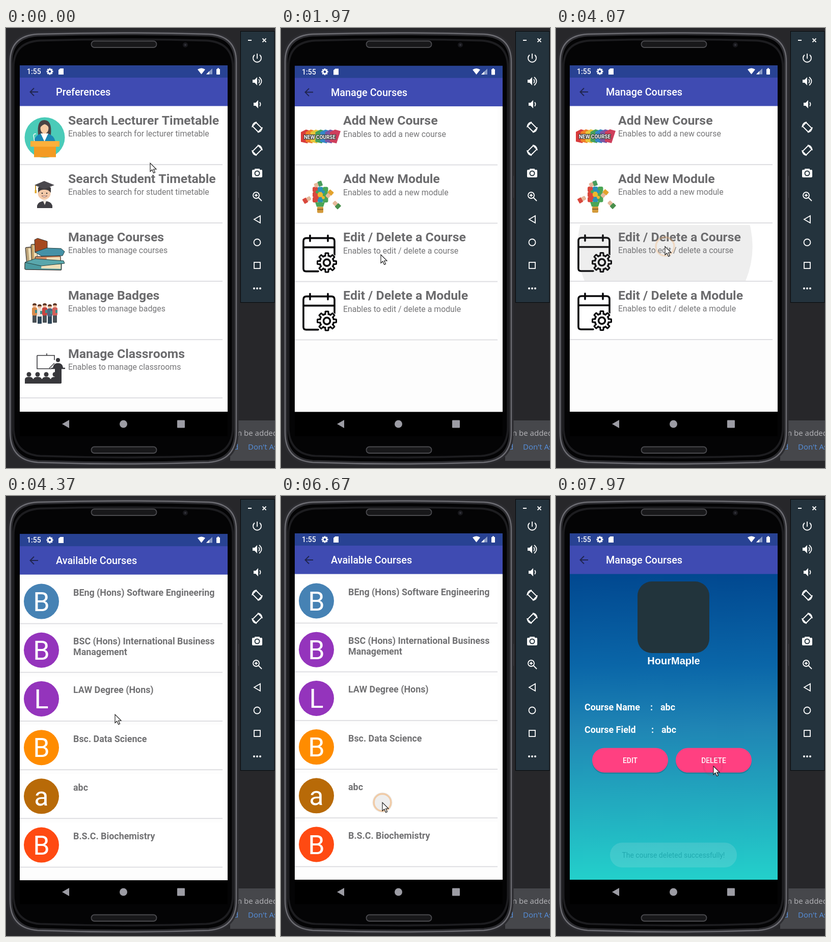
An HTML page that plays this animation: 528x860 px, repeating every 8000 ms.

```html
<!DOCTYPE html>
<html lang="en">
<head>
<meta charset="utf-8">
<title>Timetable app demo</title>
<style>
html, body { margin: 0; width: 100%; height: 100%; overflow: hidden; background: #27272a; }
svg { display: block; width: 528px; height: 860px; font-family: Roboto, sans-serif; }
.title { font-weight: 700; font-size: 24.8px; font-kerning: none; fill: #6b6b6d; }
.sub { font-size: 15.87px; fill: #757577; }
.course { font-weight: 700; font-size: 17.86px; fill: #717173; }
.letter { font-size: 52px; fill: #fff; text-anchor: middle; }
.bar { font-weight: 500; font-size: 19.84px; fill: #fff; }
.field { font-weight: 700; font-size: 17.86px; fill: #fff; }
.button { font-weight: 500; font-size: 13.9px; fill: #fff; text-anchor: middle; }
.line { fill: none; stroke: #fff; stroke-width: 1.8; }
.bold { fill: none; stroke: #08080a; stroke-width: 3.6; stroke-linecap: round; stroke-linejoin: round; }
</style>
</head>
<body>
<svg id="stage" viewBox="0 0 528 860"></svg>
<script>
const LOOP = 8000;
const stage = document.getElementById('stage');
const rect = (x, y, w, h, fill, r = 0, more = '') =>
  `<rect x="${x}" y="${y}" width="${w}" height="${h}" rx="${r}" fill="${fill}" ${more}/>`;
const dot = (x, y, r, fill, more = '') => `<circle cx="${x}" cy="${y}" r="${r}" fill="${fill}" ${more}/>`;
const path = (d, fill, more = '') => `<path d="${d}" fill="${fill}" ${more}/>`;
const line = (d, cls = 'line') => `<path d="${d}" class="${cls}"/>`;
const text = (x, y, cls, s, more = '') => `<text x="${x}" y="${y}" class="${cls}" ${more}>${s}</text>`;
const at = (x, y, s, angle = 0) => `<g transform="translate(${x} ${y}) rotate(${angle})">${s}</g>`;
const range = n => [...Array(n).keys()];

// Icons are drawn relative to the top left of their card.
function lecturer() {
  return dot(49, 61, 39.5, '#4acbb8') +
    path('M36 56 Q33 27 48 27 Q64 27 61 56 Z', '#4a4344') +
    path('M28 69 Q30 56 43 53 L54 53 Q67 56 70 69 Z', '#1b86b4') +
    path('M41 53 L48.5 69 L56 53 Z', '#fff') +
    `<ellipse cx="48.5" cy="43" rx="8" ry="10.5" fill="#f7cba4"/>` +
    path('M39 43 Q41 31 50 31 Q58 33 58 43 Q54 36 49 35 Q44 36 39 43 Z', '#4a4344') +
    path('M29 69 L27 57 Q28 53 32 54', 'none', 'stroke="#f2f6f4" stroke-width="1.5"') +
    rect(21, 68, 57, 11, '#fbb03b', 1) + rect(28, 79, 43, 20.5, '#f39a22');
}

function graduate() {
  return path('M34 85 V80 Q36 72 49 71 Q62 72 64 80 V85 Z', '#403f44') +
    path('M45 69 H53 L49 79 Z', '#eee8e0') + dot(48, 56, 12.5, '#f3c9a8') +
    path('M36 45 Q48 37 61 45 V55 Q56 48 48 49 Q40 48 36 55 Z', '#3d3a3c') +
    path('M29 40 L48 32 L68 40 L48 48 Z', '#4a484d') +
    path('M31 41 V51', 'none', 'stroke="#c7992c" stroke-width="2"') + rect(29.5, 50, 3.5, 6, '#e0a92f') +
    dot(44, 56, 1.3, '#333') + dot(53, 56, 1.3, '#333') +
    path('M43 61 Q48 66 54 61 Z', '#fff', 'stroke="#843" stroke-width=".8"');
}

function books() {
  const book = (x, y, w, h, fill, tilt) =>
    at(x, y, rect(0, 0, w, h, fill, 2, 'stroke="#3a3530" stroke-width="1.2"') +
      rect(w * .45, 2.5, w * .53, h - 5, '#efdfb8'), tilt);
  return book(11, 48, 12, 32, '#bca37a', -5) + book(22, 42, 11, 36, '#c8a46a', -3) +
    path('M29 33 L35 30 L54 36 V54 L30 58 Z', '#a5481f', 'stroke="#3a3530"') +
    path('M30 57 L53 49 L81 50 L88 56 L84 64 L43 65 Z', '#4591a6', 'stroke="#26413f"') +
    book(30, 66, 50, 14, '#d58b60', -2) + book(10, 77, 72, 14, '#4b9aa0', 1) +
    path('M10 77 L30 70 L86 74 L88 79 L42 84 Z', '#59a7ac', 'stroke="#26413f"');
}

function crowd() {
  const shirts = ['#d88b4c', '#e8e2dc', '#c64440', '#4d6580', '#d2605a'];
  return shirts.map((c, i) => {
    const x = 29 + i * 10, y = 47 + i % 2 * 2;
    return rect(x - 4, y + 15, 8, 19, ['#4a5156', '#2f4658'][i % 2], 1) +
      rect(x - 5, y + 4, 10, 16, c, 3) + dot(x, y, 4, '#edb896') +
      path(`M${x - 4} ${y} a4 4 0 0 1 8 0 Z`, '#5d3828') + rect(x + 1, y + 9, 4, 6, '#3f8f8c');
  }).join('');
}

function classroom() {
  const c = '#38383c';
  return path('M34 31 V57 H62 M34 31 H68 V40 M53 27 V31', 'none', `stroke="${c}" stroke-width="1.6"`) +
    path('M58 56 L68 46', 'none', `stroke="${c}" stroke-width="1.5"`) +
    dot(75, 40, 4, c) + path('M65 55 Q66 46 75 46 Q84 46 85 55 Z', c) +
    rect(62, 55, 27, 2.5, c) + rect(69, 57, 13, 28, c) +
    range(4).map(i => dot(18 + i * 17, 68, 4.5, c) +
      path(`M${10 + i * 17} 86 V78 Q${10 + i * 17} 73 ${18 + i * 17} 73 Q${26 + i * 17} 73 ${26 + i * 17} 78 V86 Z`, c)).join('') +
    rect(10, 77, 72, 9, c, 2);
}

function newCourse() {
  const colors = ['#d83b3b', '#ef7f28', '#e6c63b', '#45a05b', '#3487c8', '#7c55a3', '#ce3f5c'];
  return colors.map((c, i) => path(`M${12 + i * 9.5} 50 l10 -5 l11 3 l-8 24 l-13 -3 Z`, c)).join('') +
    text(49, 63, '', 'NEW COURSE', 'text-anchor="middle" font-size="10" font-weight="700" fill="#fff" stroke="#333" stroke-width="2" paint-order="stroke"');
}

function puzzle() {
  const colors = ['#d9483d', '#edb72e', '#4aa556', '#2b91b8'];
  const hand = (x, y, a, c) => at(x, y, rect(-8, -4, 9, 8, '#e6b99b', 2) + rect(0, -5, 8, 10, c, 1), a);
  return range(9).map(i => rect(35 + i % 3 * 10, 43 + (i / 3 | 0) * 10, 10.5, 10.5, colors[i * 3 % 4 ^ (i / 3 | 0)], 3)).join('') +
    range(4).map(i => dot(44 + i % 2 * 12, 53 + (i / 2 | 0) * 11, 3, colors[(i + 2) % 4])).join('') +
    path('M40 73 H59 L56 82 H43 Z', '#4aa556') + rect(44, 82, 12, 12, '#d39a3b', 2) +
    rect(44, 86, 12, 2, '#8f652c') +
    hand(46, 38, -20, '#499c5c') + hand(24, 68, 150, '#d9483d') + hand(82, 78, 45, '#498f4c') + hand(68, 57, -50, '#e3a32d');
}

function calendar() {
  const gear = range(8).map(i => rect(-4.5, -20, 9, 9, '#08080a', 2, `transform="rotate(${i * 45})"`)).join('') +
    dot(0, 0, 15.5, '#08080a') +
    range(8).map(i => rect(-1.5, -17, 3, 6, '#fff', 0, `transform="rotate(${i * 45})"`)).join('') +
    dot(0, 0, 12, '#fff') + dot(0, 0, 6.5, 'none', 'stroke="#08080a" stroke-width="3.6"');
  return line('M46 94 H22 Q17 94 17 89 V35 Q17 29 23 29 H72 Q78 29 78 35 V62 M17 47 H78 M30 24 V35 M65 24 V35', 'bold') +
    at(63, 77, dot(0, 0, 21, '#fff') + gear);
}

function appBar(name) {
  const gear = range(8).map(i => rect(-1.5, -6.5, 3, 4, '#fff', 0, `transform="rotate(${i * 45})"`)).join('');
  return rect(27, 73, 408, 24.5, '#284293') + rect(27, 97, 408, 55.5, '#3f4bb2') +
    text(41, 90, 'bar', '1:55', 'style="font-size:14px"') +
    at(86, 85, gear + dot(0, 0, 3.6, 'none', 'stroke="#fff" stroke-width="2.2"')) +
    path('M103 82 L106.5 79 H113 V91 H103 Z', '#fff') +
    path('M376 81 Q383.5 76 391 81 L383.5 90.5 Z', '#fff') +
    path('M393 90.5 L405 79 V90.5 Z', '#8b9cc8') + path('M393 90.5 L399 84.5 V90.5 Z', '#fff') +
    rect(413, 80, 7, 11, '#fff', 1) + rect(415, 78.5, 3, 2, '#fff') +
    path('M63 125 H48 M55 117.5 L47.5 125 L55 132.5', 'none', 'stroke="#20254f" stroke-width="2"') +
    text(98, 132, 'bar', name);
}

const listBack = rect(27, 152, 408, 598, '#fdfdfd');
const card = (y, h) => rect(27, y, 398, h, '#fff') + rect(27, y + h, 398, 1.8, '#dcdce0');

function menu(name, items) {
  return listBack + items.map(([title, sub, icon], i) => {
    const y = 153 + i * 114;
    return card(y + (i ? 4 : 0), i ? 109 : 113) + at(27, y, icon()) +
      text(122, y + 35.5, 'title', title) + text(122, y + 59, 'sub', 'Enables to ' + sub);
  }).join('') + appBar(name);
}

function courses() {
  const items = [
    ['#4682b4', 'BEng (Hons) Software Engineering'],
    ['#9434bc', 'BSC (Hons) International Business|Management'],
    ['#9434bc', 'LAW Degree (Hons)'],
    ['#ff8c00', 'Bsc. Data Science'],
    ['#b86a08', 'abc'],
    ['#ff4a12', 'B.S.C. Biochemistry']];
  return listBack + items.map(([color, name], i) => {
    const y = 152 + i * 95.2;
    return card(y + 9, 86.5) + dot(69.5, y + 53, 34.5, color) +
      text(69.5, y + 71.5, 'letter', name[0]) +
      name.split('|').map((s, k) => text(132, y + 42 + k * 20.9, 'course', s)).join('');
  }).join('') + appBar('Available Courses');
}

function details() {
  const button = (x, label) => rect(x, 495, 149, 48, '#00000028', 24) +
    rect(x, 492.5, 149, 48, '#ff4081', 24) + text(x + 74.5, 522, 'button', label);
  const field = (y, name, colon, value) => text(56, y, 'field', name) +
    text(colon, y, 'field', ':') + text(value, y, 'field', 'abc');
  return rect(27, 152, 408, 598, 'url(#sea)') + rect(160, 167, 141, 140, '#22343c', 28) +
    text(231, 328.5, '', 'HourMaple', 'text-anchor="middle" font-family="Liberation Sans, sans-serif" font-weight="700" font-size="20" fill="#fff"') +
    field(419, 'Course Name', 185, 205) + field(463, 'Course Field', 187, 207) +
    button(71, 'EDIT') + button(235, 'DELETE') + appBar('Manage Courses');
}

function toolbar() {
  const speaker = 'M-9 -3 H-5 L0 -8 V8 L-5 3 H-9 Z';
  const rotate = rect(-5, -8, 10, 16, 'none', 1, 'stroke="#fff" stroke-width="2" transform="rotate(-45)"') +
    line('M-10 0 Q-9 -9 -1 -10 M10 0 Q9 9 1 10');
  const icons = [
    line('M0 -9 V1 M-5 -6.5 A8 8 0 1 0 5 -6.5'),
    path(speaker, '#fff') + line('M3 -4 Q6 0 3 4 M4 -8 Q13 0 4 8'),
    at(2, 0, path(speaker, '#fff') + line('M3 -4 Q6 0 3 4')),
    rotate, `<g transform="scale(-1 1)">${rotate}</g>`,
    rect(-10, -7, 20, 15, '#fff', 2) + rect(-5, -9, 10, 4, '#fff', 1) + dot(0, 0, 4.5, 'none', 'stroke="#24333d" stroke-width="2"'),
    dot(-2, -2, 6, 'none', 'class="line"') + line('M2.5 2.5 L9 9 M-5 -2 H1 M-2 -5 V1'),
    line('M-6 0 L6 -7 V7 Z'), dot(0, 0, 6.5, 'none', 'class="line"'),
    rect(-6, -6, 12, 12, 'none', 0, 'class="line"'),
    range(3).map(i => dot(i * 6 - 6, 0, 2, '#fff')).join('')];
  return rect(460.5, 6.5, 66.5, 530, '#24333d', 0, 'stroke="#06080a"') +
    line('M475 24 H482 M503.5 20.5 L510.5 27.5 M510.5 20.5 L503.5 27.5') +
    icons.map((s, i) => at(493, 59 + i * 45, s)).join('');
}

function phone() {
  const outline = 'M8 66 Q8 15 62 12 Q230 7 398 12 Q452 15 452 66 V790 Q452 845 398 849 Q230 855 62 849 Q8 845 8 790 Z';
  const slot = y => rect(167.5, y, 128, 12.5, '#18181a', 6, 'stroke="#4a4a4e" stroke-width="1.8"');
  return rect(453, 289, 3.5, 43, '#75757a') + rect(452, 360, 4, 101, '#75757a') +
    path(outline, '#040405', 'stroke="#2c2c30" stroke-width="9"') +
    path(outline, 'none', 'stroke="#6c6c72" stroke-width="2.4"') +
    path(outline, 'none', 'stroke="#1d1d20" stroke-width="4" transform="translate(6.9 12.9) scale(.97)"') +
    slot(25.5) + slot(818.5) + dot(352, 33, 5, '#18181c') + dot(352, 33, 2, '#33333a') +
    rect(27, 750, 408, 48, '#000') +
    path('M110 774 L124 766 V782 Z', '#9c9ca4') + dot(230.5, 774, 7.5, '#9c9ca4') + rect(336, 766.5, 15, 15, '#9c9ca4', 1);
}

const screens = [
  menu('Preferences', [
    ['Search Lecturer Timetable', 'search for lecturer timetable', lecturer],
    ['Search Student Timetable', 'search for student timetable', graduate],
    ['Manage Courses', 'manage courses', books],
    ['Manage Badges', 'manage badges', crowd],
    ['Manage Classrooms', 'manage classrooms', classroom]]),
  menu('Manage Courses', [
    ['Add New Course', 'add a new course', newCourse],
    ['Add New Module', 'add a new module', puzzle],
    ['Edit / Delete a Course', 'edit / delete a course', calendar],
    ['Edit / Delete a Module', 'edit / delete a module', calendar]]),
  courses(), details()];

const sea = [[0, '#014890'], [30, '#0a66a8'], [50, '#1f84b4'], [75, '#22aabf'], [100, '#23d0cb']];

stage.innerHTML =
  `<defs><linearGradient id="sea" x2="0" y2="1">${sea.map(([o, c]) => `<stop offset="${o}%" stop-color="${c}"/>`).join('')}</linearGradient>
  <clipPath id="reveal"><rect id="window" x="27" width="408"/></clipPath>
  <clipPath id="pressed"><rect id="row" x="27" width="398"/></clipPath></defs>` +
  rect(0, 0, 528, 860, '#27272a') + rect(440, 767, 88, 79, '#46474b') +
  `<g font-family="Open Sans, sans-serif" font-size="15">` +
  text(454, 797, '', 'n be added', 'fill="#b6b6ba"') + text(447, 824, '', 'd', 'fill="#5690de"') +
  text(475, 824, '', "Don't Ask", 'fill="#5690de"') + '</g>' +
  phone() + toolbar() +
  screens.map((s, i) => `<g id="screen${i}">${s}</g>` + (i < 3 ? rect(27, 58, 408, 692, '#000', 0, `id="shade${i}"`) : '')).join('') +
  `<g clip-path="url(#pressed)">${dot(0, 0, 0, '#777', 'id="ripple"')}</g>
  <g id="toast">${rect(106, 677.5, 249, 48.5, '#eee', 24)}${text(230.5, 707, '', 'The course deleted successfully!', 'text-anchor="middle" font-size="13.9" fill="#112"')}</g>
  ${dot(0, 0, 0, 'none', 'id="ring" stroke-width="3.5"')}
  ${path('M0 0 V16.5 L3.8 13 L6.7 19.5 L9.5 18.3 L6.6 12 H12 Z', '#fff', 'id="cursor" stroke="#111" stroke-width="1.1"')}`;

const el = id => document.getElementById(id);
const set = (node, attrs) => { for (const k in attrs) node.setAttribute(k, attrs[k]); };
const clamp = v => Math.min(1, Math.max(0, v));

const bezier = (a, b, c, d, s) =>
  a * (1 - s) ** 3 + 3 * b * s * (1 - s) ** 2 + 3 * c * s * s * (1 - s) + d * s ** 3;

// Fast start with a very long settle, built from two joined curves.
function settle(x) {
  if (x <= 0 || x >= 1) return clamp(x);
  const [xs, ys] = x < 1 / 6
    ? [[0, .05, .1333, 1 / 6], [0, 0, .06, .4]]
    : [[1 / 6, .2083, .25, 1], [.4, .82, 1, 1]];
  let lo = 0, hi = 1;
  for (let i = 0; i < 24; i++) {
    const mid = (lo + hi) / 2;
    if (bezier(...xs, mid) < x) lo = mid; else hi = mid;
  }
  return bezier(...ys, lo);
}

const opens = [1696, 4133, 6933];
const clicks = [
  { t: 1440, x: 196, y: 443, top: 385, h: 109 },
  { t: 3880, x: 214, y: 427, top: 385, h: 109 },
  { t: 6580, x: 199, y: 599, top: 542, h: 86 },
  { t: 7690, x: 308, y: 528 }];
const moves = [
  [0, 283, 264], [150, 283, 264], [830, 196, 443], [2050, 196, 443], [2650, 248, 245],
  [3050, 248, 245], [3700, 214, 427], [4900, 214, 427], [5650, 214, 345], [6380, 199, 599],
  [6950, 199, 599], [7170, 203, 594], [7340, 203, 594], [7670, 309, 528], [LOOP, 309, 528]];

function pointer(t) {
  const i = moves.findIndex(m => m[0] > t);
  const [t0, x0, y0] = moves[i - 1], [t1, x1, y1] = moves[i];
  const k = (t - t0) / (t1 - t0), e = k * k * (3 - 2 * k);
  return [x0 + (x1 - x0) * e, y0 + (y1 - y0) * e];
}

function showScreens(t) {
  const current = opens.filter(o => t >= o).length;
  const age = current ? t - opens[current - 1] : 425;
  const p = settle(age / 425);
  screens.forEach((_, i) => {
    const entering = i === current, leaving = i === current - 1 && p < .7;
    const y = entering ? 30.4 * (1 - p) : -15.2 * p;
    const node = el('screen' + i);
    node.style.display = entering || leaving ? '' : 'none';
    node.setAttribute('transform', `translate(0 ${y})`);
    if (entering && p < 1) node.setAttribute('clip-path', 'url(#reveal)');
    else node.removeAttribute('clip-path');
    if (i < 3) set(el('shade' + i), {
      opacity: leaving ? .1 * clamp(age / 117) : 0, y: 73 + y, height: 677 });
  });
  const h = 677 * clamp(2.1 * p);
  set(el('window'), { y: 750 - h, height: h });
}

function showClick(t) {
  const click = clicks.find(c => t >= c.t && t < c.t + 350);
  const age = click ? t - click.t : 350;
  const { x = 0, y = 0, top, h } = click || {};
  set(el('ring'), { cx: x, cy: y, r: 13 + 5 * clamp(age / 120), stroke: top ? '#f3b070' : '#a03860',
    opacity: age < 350 ? .75 * (1 - age / 350) : 0 });
  const spread = clamp((age - 60) / 190);
  set(el('ripple'), { cx: x, cy: y, r: 300 * spread ** 1.5,
    opacity: top && age < 256 ? .12 : 0 });
  if (top) set(el('row'), { y: top, height: h });
}

function draw() {
  const t = performance.now() % LOOP;
  showScreens(t);
  showClick(t);
  el('toast').setAttribute('opacity', .14 * clamp((t - 7900) / 70));
  el('cursor').setAttribute('transform', `translate(${pointer(t)})`);
  requestAnimationFrame(draw);
}
draw();
</script>
</body>
</html>
```
